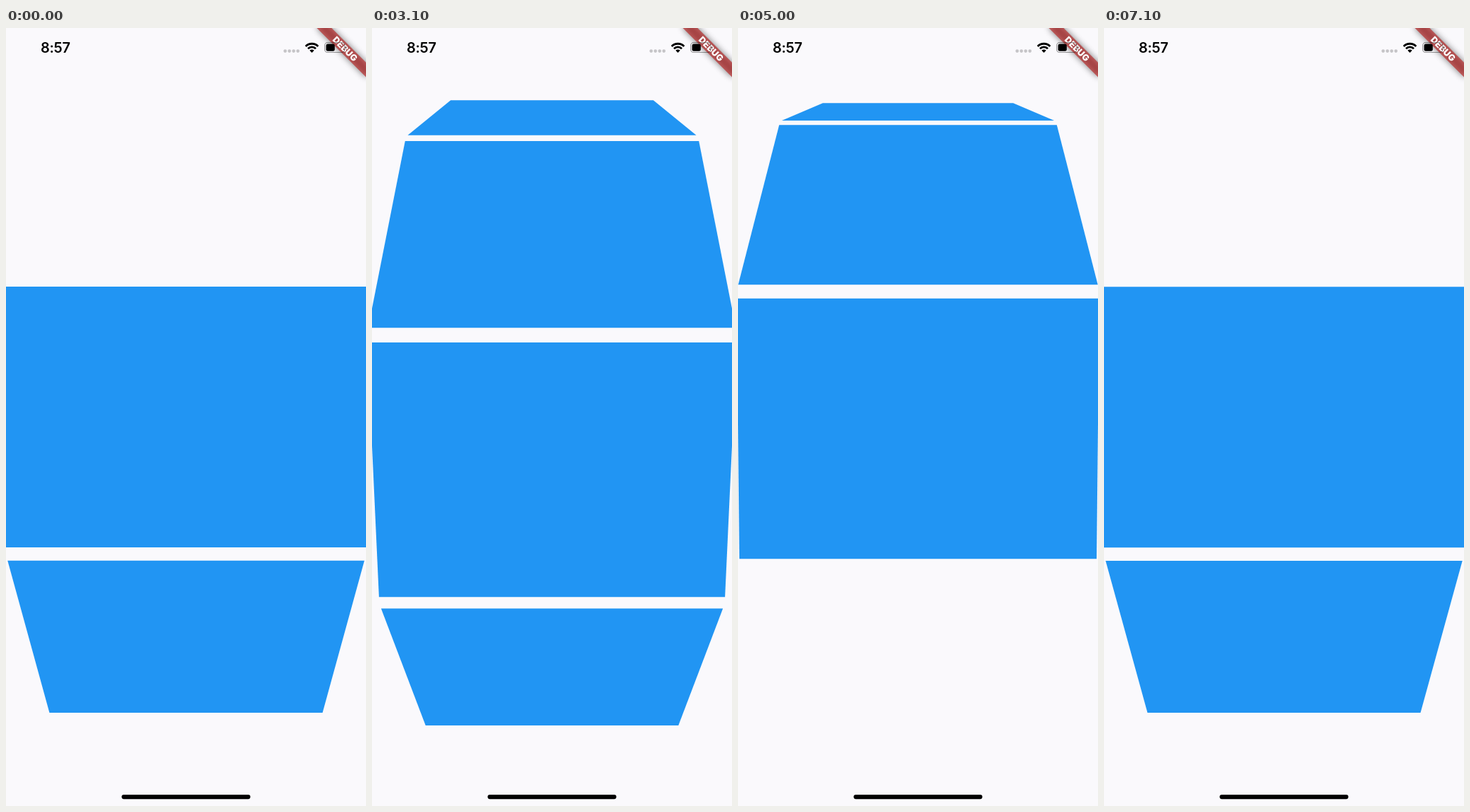
Animation of 509x1101 px, one loop 7200 ms. Source, as an HTML page without scripts:

```html
<!DOCTYPE html>
<html lang="en">
<head>
<meta charset="utf-8">
<title>Wheel list</title>
<style>
  /* seconds into the loop, and scroll position counted in items */
  @property --t { syntax: "<number>"; inherits: true; initial-value: 0; }
  @property --u { syntax: "<number>"; inherits: true; initial-value: 0; }

  html, body { margin: 0; width: 100%; height: 100%; overflow: hidden; }

  .stage {
    position: relative;
    width: 509px;
    height: 1101px;
    overflow: hidden;
    background: #faf9fc;
    animation: clock 7.2s steps(72) -1ms infinite;
  }
  @keyframes clock {
    from { --t: 0; }
    to { --t: 7.2; }
  }

  /* Each gesture is a finger drag, a fling slowed by friction, and a spring at the list end. */
  .wheel {
    --peek: clamp(0, (var(--t) - 0.9) / 0.6, 1);

    --drag-up: clamp(0, (var(--t) - 2.2) / 0.8, 1);
    --fling-up: clamp(0, var(--t) - 3, 0.995);
    --hit-end: max(0, var(--t) - 3.995);

    --drag-down: clamp(0, (var(--t) - 4.8) / 0.5, 1);
    --fling-down: clamp(0, var(--t) - 5.3, 1.1965);
    --hit-start: max(0, var(--t) - 6.4965);

    --u: calc(
      0.63 * var(--peek) * var(--peek) * (3 - 2 * var(--peek))
      + 1.775 * pow(var(--drag-up), 1.8)
      + 7.639 * (1 - exp(-2 * var(--fling-up)))
      + 0.2 * (exp(-9.07 * var(--hit-end)) - exp(-22 * var(--hit-end)))
      - 0.2868 * pow(var(--drag-down), 2)
      - 9.589 * (1 - exp(-2 * var(--fling-down)))
      - 0.167 * (exp(-9.07 * var(--hit-start)) - exp(-22 * var(--hit-start)))
    );
    position: absolute;
    inset: 0;
  }

  .item {
    --d: calc(var(--u) - var(--i));
    --r: 1101.6px;
    position: absolute;
    left: 0;
    top: 366.1px;
    width: 509px;
    height: 368.8px;
    background: #2195f3;
    transform:
      perspective(409.8px)
      translateZ(calc(-1 * var(--r)))
      rotateX(calc(var(--d) * 20.089deg))
      translateZ(var(--r));
    /* hidden once its flat slot has left the viewport */
    opacity: clamp(0, (1.9933 - max(var(--d), -1 * var(--d))) * 100000, 1);
  }

  svg { position: absolute; left: 0; top: 0; }
  text { font-family: Inter, Roboto, sans-serif; }
  .time { font-size: 20px; font-weight: 600; letter-spacing: -0.3px; }
  .tag { font-size: 12.5px; font-weight: 900; fill: #fff; text-anchor: middle; }
</style>
</head>
<body>
<div class="stage">
  <div class="wheel">
    <div class="item" style="--i:0"></div>
    <div class="item" style="--i:1"></div>
    <div class="item" style="--i:2"></div>
    <div class="item" style="--i:3"></div>
    <div class="item" style="--i:4"></div>
    <div class="item" style="--i:5"></div>
    <div class="item" style="--i:6"></div>
    <div class="item" style="--i:7"></div>
    <div class="item" style="--i:8"></div>
    <div class="item" style="--i:9"></div>
  </div>

  <svg width="509" height="1101" viewBox="0 0 509 1101">
    <defs>
      <filter id="soft" x="-30%" y="-150%" width="160%" height="400%">
        <feGaussianBlur stdDeviation="4.87"/>
      </filter>
      <rect id="band" x="-49.2" y="34.4" width="98.4" height="14.8"/>
    </defs>

    <!-- corner ribbon -->
    <g transform="translate(509 0) rotate(45)">
      <use href="#band" opacity=".5" filter="url(#soft)"/>
      <use href="#band" fill="#b71c1c" fill-opacity=".627"/>
      <text class="tag" x="0" y="46.3">DEBUG</text>
    </g>

    <!-- status bar -->
    <text class="time" x="49" y="35">8:57</text>
    <g fill="#c5c4c7">
      <circle cx="394.7" cy="32.6" r="2.3"/>
      <circle cx="400.7" cy="32.6" r="2.3"/>
      <circle cx="406.7" cy="32.6" r="2.3"/>
      <circle cx="412.7" cy="32.6" r="2.3"/>
    </g>
    <g fill="none" stroke="#000" stroke-width="2.8">
      <path d="M423.7 25.9a12.4 12.4 0 0 1 17.6 0"/>
      <path d="M427 29.2a7.8 7.8 0 0 1 11 0"/>
    </g>
    <path d="M432.5 35l-3.2-3.2a4.5 4.5 0 0 1 6.4 0z"/>
    <rect x="450.7" y="20.7" width="28" height="13.8" rx="4" fill="none" stroke="#000" stroke-opacity=".4" stroke-width="1.2"/>
    <path d="M480.2 25.2a2.6 2.6 0 0 1 0 4.8z" fill-opacity=".4"/>
    <rect x="452.5" y="22.5" width="12.3" height="10.3" rx="2.4"/>

    <!-- home indicator -->
    <rect x="163.5" y="1085" width="182" height="6.2" rx="3.1"/>
  </svg>
</div>
</body>
</html>
```
